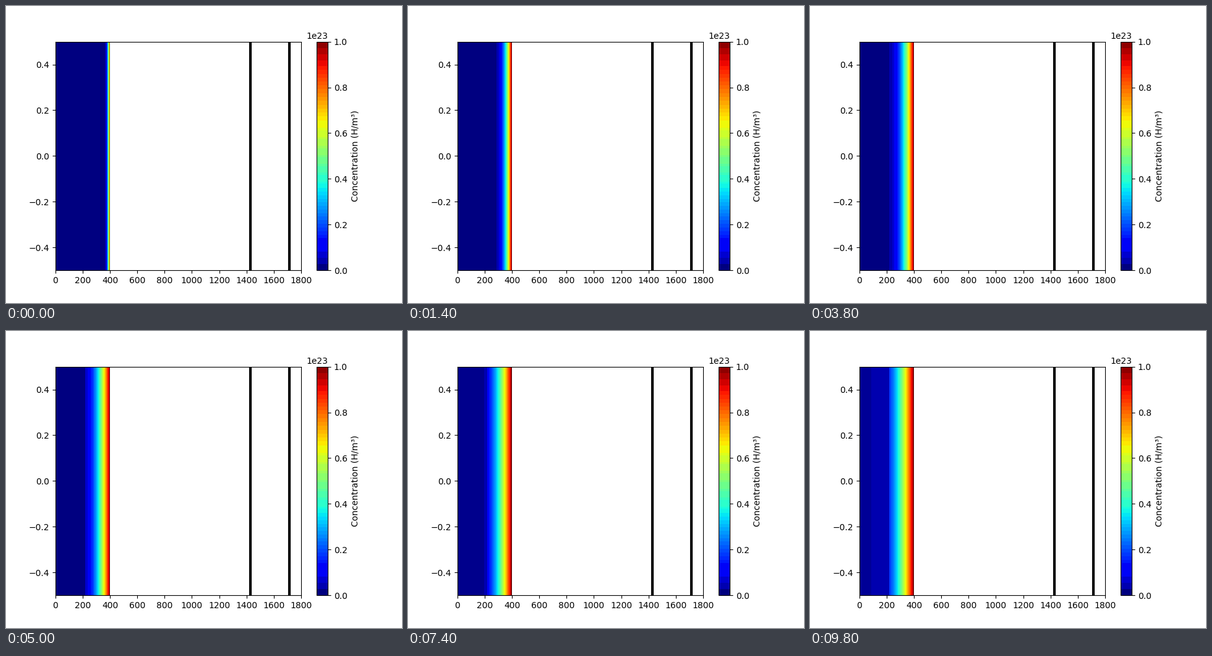
These frames come from a looping animation (640x480 px, 10 s). A matplotlib script:

```python
import math
import numpy as np
import matplotlib.pyplot as plt
from matplotlib.animation import FuncAnimation
from matplotlib.cm import ScalarMappable
from matplotlib.colors import ListedColormap, Normalize

FRAMES, STEP = 50, 200
X_MAX = 1800
COLS = 88            # pixel columns of the filled region
WALL = 48            # column of the inner material interface
AXES_W = 496 * 0.8   # axes width in pixels
erfc = np.vectorize(math.erfc)


def banded_jet(size=1000):
    """Jet with neighbouring shades merged into flat bands."""
    rgb = np.round(plt.get_cmap("jet", size)(np.arange(size))[:, :3] * 255)
    keys = rgb.astype(int) // [32, 16, 32] @ [256, 16, 1]
    for key in np.unique(keys):
        rgb[keys == key] = rgb[keys == key].mean(axis=0)
    rgb[keys == keys[0]] = (0, 0, 128)
    return ListedColormap(rgb / 255)


def concentration(n):
    """Relative concentration per column: diffusion inwards from the right."""
    x = np.arange(COLS) + 0.5
    width = 5.8 * math.sqrt(n + 0.75)
    right = erfc((COLS - x) / width)
    at_wall = 0.27 * math.erfc((COLS - WALL) / width)
    left = at_wall * erfc((WALL - x) / (2 * width))
    return np.where(x < WALL, left, right)


def colours(n):
    c = concentration(n)
    rgb = cmap(c)[:, :3]
    base = 128 if n < 31 else 140 if n < 46 else 150
    rgb[c < 0.028] = (0, 0, base / 255)
    rgb[-1] = rgb[-2] * 0.5
    return rgb[np.newaxis]


cmap = banded_jet()
fig, ax = plt.subplots(figsize=(6.4, 4.8), dpi=100)
bar = fig.colorbar(ScalarMappable(Normalize(0, 1e23), cmap), ax=ax)
bar.set_label("Concentration (H/m³)")

field = ax.imshow(colours(0), extent=(0, COLS / AXES_W * X_MAX, -0.5, 0.5),
                  aspect="auto", interpolation="nearest")
for x in (1429, 1714.5):
    ax.axvline(x, color="black", lw=3)
ax.set_xlim(0, X_MAX)
ax.set_ylim(-0.5, 0.5)


def draw(n):
    field.set_data(colours(n))
    return [field]


anim = FuncAnimation(fig, draw, frames=FRAMES, interval=STEP,
                     repeat=True, repeat_delay=0)
plt.show()
```
